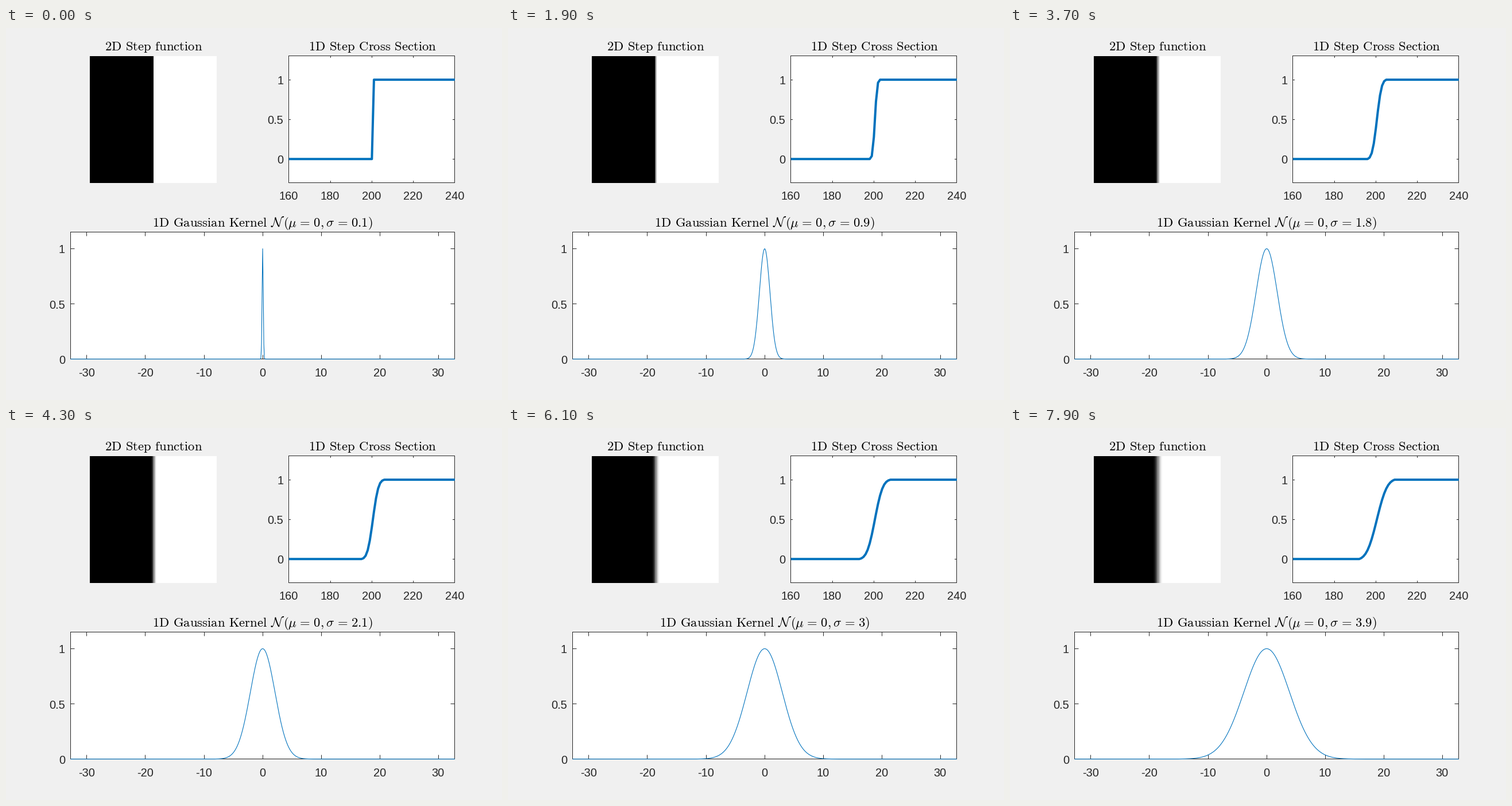
Animation of 864x648 px, one loop 8 s. Source, as a matplotlib script:

```python
import math

import numpy as np
import matplotlib.pyplot as plt
from matplotlib.animation import FuncAnimation

W, H = 864, 648
FRAME_MS, FRAMES = 100, 80
BLUE, INK, GREY = "#0072BD", "#262626", "#F0F0F0"

plt.rcParams.update({
    "font.family": "Liberation Sans",
    "mathtext.fontset": "cm",
    "toolbar": "None",
})

# At 72 dpi one point is one pixel, so the whole stage is drawn in pixels.
fig = plt.figure(figsize=(W / 72, H / 72), dpi=72, facecolor=GREY)
ax = fig.add_axes([0, 0, 1, 1])


def mid(v):
    """Centre of the pixel that holds v."""
    return math.floor(v) + 0.5


class Panel:
    """A boxed plot with exact pixel edges and data limits."""

    def __init__(self, left, top, right, bottom, xlim, ylim, tick):
        self.left, self.bottom = left, bottom
        self.x_min, self.y_min = xlim[0], ylim[0]
        self.xs = (right - left) / (xlim[1] - xlim[0])
        self.ys = (bottom - top) / (ylim[1] - ylim[0])
        self.tick = tick
        l, t, r, b = self.edges = [mid(v) for v in (left, top, right, bottom)]
        ax.add_patch(plt.Rectangle((l, t), r - l, b - t,
                                   fc="white", ec="none", zorder=1))
        segment([l, r, r, l, l], [t, t, b, b, t])

    def px(self, x):
        return self.left + self.xs * (np.asarray(x, float) - self.x_min)

    def py(self, y):
        return self.bottom - self.ys * (np.asarray(y, float) - self.y_min)

    def xticks(self, values, baseline):
        _, top, _, bottom = self.edges
        for v in values:
            x = mid(self.px(v))
            segment([x, x], [top, top + self.tick])
            segment([x, x], [bottom, bottom - self.tick])
            label(self.px(v) - 0.5, baseline, str(v), "center")

    def yticks(self, values, text_right):
        left, _, right, _ = self.edges
        for v in values:
            y = mid(self.py(v))
            segment([left, left + self.tick], [y, y])
            segment([right, right - self.tick], [y, y])
            label(text_right, self.py(v) + 8, f"{v:g}", "right")


def segment(xs, ys):
    ax.plot(xs, ys, color=INK, lw=1, snap=False, zorder=3,
            solid_capstyle="projecting", solid_joinstyle="miter")


def label(x, y, text, ha):
    ax.text(x, y, text, size=20, color=INK, ha=ha, va="baseline", zorder=5)


def title(x, y, text):
    return ax.text(x, y, text, size=22.65, color="black", ha="center",
                   va="baseline", zorder=5)


# Spaces are set to the widths TeX uses; mathtext's own are narrower.
SPACE = r"\hspace{0.38}"
EQUALS = r"\hspace{0.117}=\hspace{0.117}"


def roman(text):
    return SPACE.join(rf"\mathrm{{{word}}}" for word in text.split())


def kernel_title(sigma):
    return (f"${roman('1D Gaussian Kernel')}{SPACE}"
            r"\mathcal{N}\hspace{0.168}"
            rf"(\mu{EQUALS}0,\sigma\hspace{{0.04}}{EQUALS}"
            rf"{round(sigma, 1):g})$")


def gauss(x, sigma):
    return np.exp(-x ** 2 / (2 * sigma ** 2))


def blurred_step(cols, sigma):
    """Unit step after column 200, smoothed by a kernel cut at two sigma."""
    r = math.ceil(2 * sigma)
    d = np.arange(-r, r + 1)
    w = gauss(d, sigma)
    return ((cols[:, None] + d > 200) * w).sum(axis=1) / w.sum()


# The running sum keeps its rounding error, which sets the kernel radius.
SIGMAS = np.cumsum(np.full(40, 0.1))

section = Panel(492.75, 48.6, 781.9, 269.7, (160, 240), (-0.3, 1.3), 3)
section.xticks(range(160, 241, 20), 299)
section.yticks([0, 0.5, 1], 483.5)

kernel = Panel(112.3, 355.6, 781.9, 576.7, (-32.8, 32.8), (0, 1.15), 6.5)
kernel.xticks(range(-30, 31, 10), 607)
kernel.yticks([0, 0.5, 1], 103)

title(257, 39, f"${roman('2D Step function')}$")
title(638, 39, f"${roman('1D Step Cross Section')}$")
heading = title(447, 346, kernel_title(SIGMAS[0]))

# The picture shows columns 100 to 300, one sample per screen pixel.
pixel_cols = np.floor(100 + (np.arange(146, 367) + 0.5 - 146.4) / 1.1)
picture = ax.imshow(np.zeros((1, pixel_cols.size)), cmap="gray",
                    vmin=0, vmax=1, extent=(146, 367, 270, 49),
                    aspect="auto", interpolation="nearest", zorder=2)

cols = np.arange(160, 241)
grid = np.arange(-328, 329) / 10
step_line, = ax.plot([], [], color=BLUE, lw=4, zorder=4,
                     solid_capstyle="butt", solid_joinstyle="round")
bell_line, = ax.plot([], [], color=BLUE, lw=1.1, zorder=4,
                     solid_capstyle="butt", solid_joinstyle="round")

ax.set_xlim(0, W)
ax.set_ylim(H, 0)
ax.axis("off")


def draw(i):
    t = i * FRAME_MS
    sigma = SIGMAS[max(0, (t - 300) // 200)]
    picture.set_data(blurred_step(pixel_cols, sigma)[None, :])
    step_line.set_data(section.px(cols),
                       section.py(blurred_step(cols, sigma)))
    bell_line.set_data(kernel.px(grid), kernel.py(gauss(grid, sigma)))
    heading.set_text(kernel_title(sigma))
    return picture, step_line, bell_line, heading


anim = FuncAnimation(fig, draw, frames=FRAMES, interval=FRAME_MS,
                     repeat=True, repeat_delay=0, blit=False)
plt.show()
```
